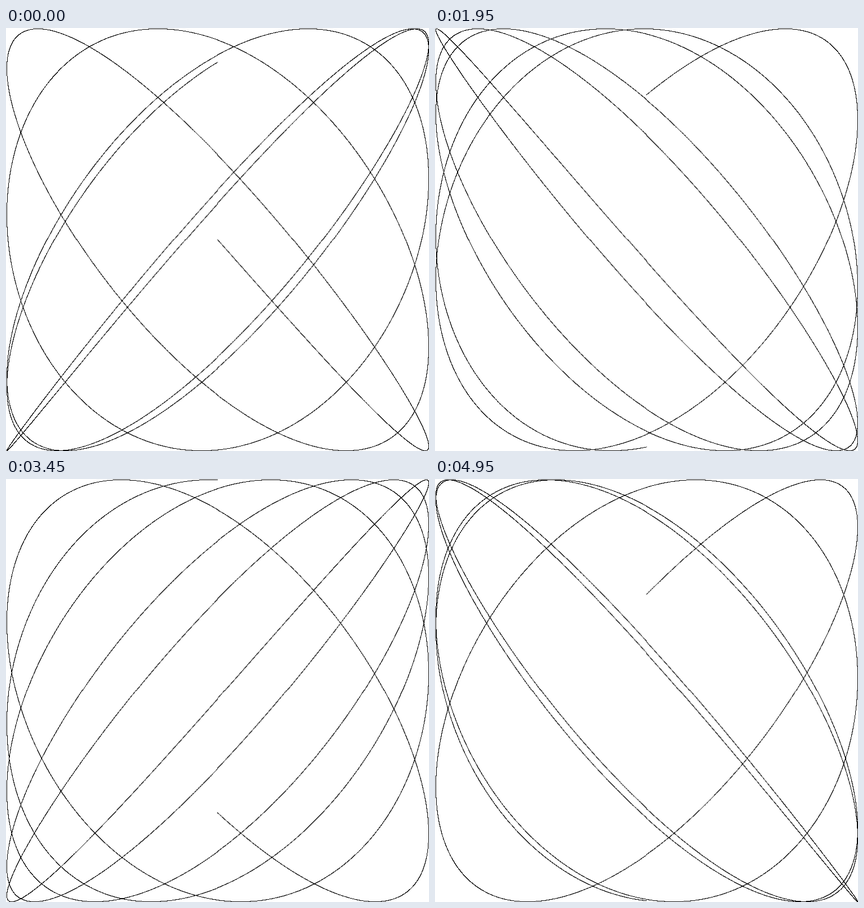
Recreate the animation shown at these times as an HTML page with a canvas. Size 748 by 748 pixels, loop 5000 ms.

```html
<!DOCTYPE html>
<html lang="en">
<head>
<meta charset="utf-8">
<title>Lissajous figure</title>
<style>
  html, body { margin: 0; width: 100%; height: 100%; overflow: hidden; background: #fff; }
  canvas { display: block; width: 748px; height: 748px; }
</style>
</head>
<body>
<canvas id="stage" width="748" height="748"></canvas>
<script>
const RADIUS = 374;
const PLOT_SIZE = 2 * RADIUS + 1;
const CYCLES = 5;
const TIME_STEP = 0.001;
const FREQUENCY = 1.131956;
const PHASE_STEP = 0.1;
const FRAME_MS = 50;
const FRAME_COUNT = 100;
const WHITE = 0xffffffff;
const BLACK = 0xff000000;

const stage = document.getElementById("stage");
const ctx = stage.getContext("2d");

// The curve is plotted on an odd-sized grid with a true centre, then fitted to the stage.
const plot = document.createElement("canvas");
plot.width = plot.height = PLOT_SIZE;
const plotCtx = plot.getContext("2d");
const image = plotCtx.createImageData(PLOT_SIZE, PLOT_SIZE);
const pixels = new Uint32Array(image.data.buffer);

// Rounds by truncating toward zero, like an integer cast.
const toPixel = v => RADIUS + Math.trunc(v * RADIUS + 0.5);

function draw(frame) {
  const phase = frame * PHASE_STEP;
  pixels.fill(WHITE);
  for (let t = 0; t < CYCLES * 2 * Math.PI; t += TIME_STEP) {
    const x = toPixel(Math.sin(t));
    const y = toPixel(Math.sin(t * FREQUENCY + phase));
    pixels[y * PLOT_SIZE + x] = BLACK;
  }
  plotCtx.putImageData(image, 0, 0);
  ctx.drawImage(plot, 0, 0, stage.width, stage.height);
}

const start = performance.now();
let shown = -1;

function tick() {
  const elapsed = Math.max(0, performance.now() - start);
  const frame = Math.floor(elapsed / FRAME_MS) % FRAME_COUNT;
  if (frame !== shown) draw(shown = frame);
  requestAnimationFrame(tick);
}
tick();
</script>
</body>
</html>
```
